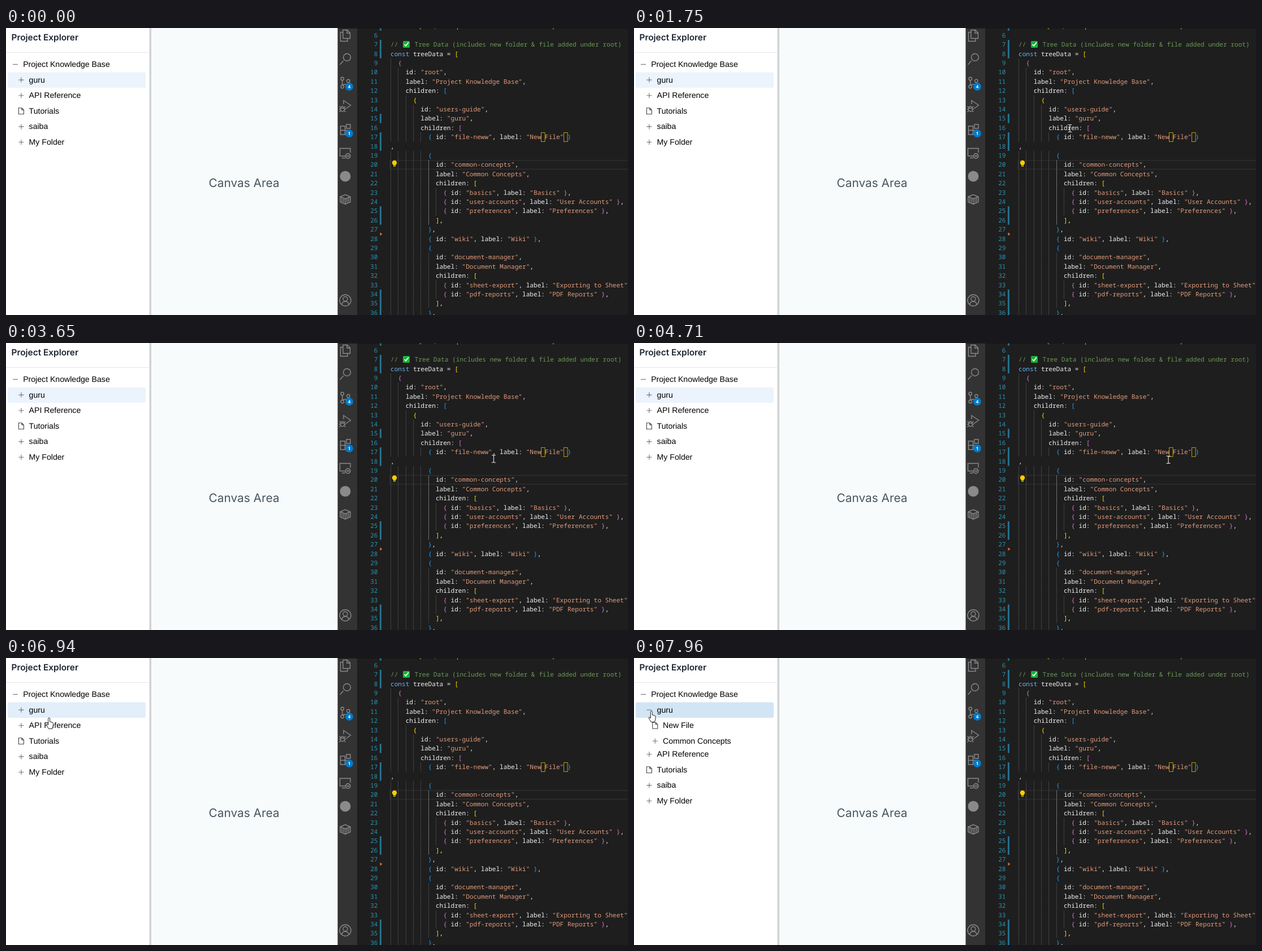
Recreate the animation shown at these times as an HTML page. Size 1100 by 509 pixels, loop 8000 ms.

```html
<!DOCTYPE html>
<html lang="en">
<head>
<meta charset="utf-8">
<title>Project Explorer</title>
<style>
  html, body { margin: 0; height: 100%; overflow: hidden; }
  svg { display: block; width: 100vw; height: 100vh; }
  text { white-space: pre; text-rendering: geometricPrecision; }
  .code text { font: 500 11.1px "Noto Sans Mono", "DejaVu Sans Mono", monospace; fill: #f0f0f0; }
  .code .number { fill: #2b91af; text-anchor: end; }
  .tree text { font: 14.1px "Liberation Sans", Arial, sans-serif; fill: #000; }
  .tree path { fill: none; stroke: #75707c; stroke-width: 1.1; }
  .tree .file { stroke: #444; }
  .icons { fill: none; stroke: #8a8a8a; stroke-width: 1.4; }
  .badge circle { fill: #007acc; stroke: none; }
  .badge text { font: bold 8px "Open Sans", sans-serif; fill: #fff; stroke: none; text-anchor: middle; }
  .cursor { stroke-linejoin: round; }
</style>
</head>
<body>
<svg viewBox="0 0 1100 509" preserveAspectRatio="none">
  <defs>
    <pattern id="hatch" width="3" height="3" patternUnits="userSpaceOnUse">
      <rect width="3" height="3" fill="#1e3c48"/>
      <path d="M0 3L3 0" stroke="#2a9ac4" stroke-width="1.4"/>
    </pattern>
    <clipPath id="reveal"><rect id="revealBox" y="106" width="253" height="0"/></clipPath>
  </defs>

  <rect width="1100" height="509" fill="#fff"/>
  <rect x="257" width="330" height="509" fill="#f8fbfb"/>
  <rect x="253.5" width="3.5" height="509" fill="#d0d4d7"/>
  <path d="M0 43.5H253" stroke="#e4e6e9"/>
  <text x="9.5" y="22" font-family="Inter, sans-serif" font-size="15.4" font-weight="600" fill="#1b2430">Project Explorer</text>
  <text x="421" y="282" font-family="Inter, sans-serif" font-size="20.8" fill="#465560" text-anchor="middle">Canvas Area</text>

  <g class="tree">
    <rect id="selected" x="3" y="78.5" width="244" height="27.5" rx="3"/>
    <g id="topRows"></g>
    <g id="childRows" clip-path="url(#reveal)"></g>
    <g id="lowRows"></g>
  </g>

  <rect x="586.5" width="35" height="509" fill="#333"/>
  <g class="icons">
    <path transform="translate(600 13)" d="M-4-9.500H3.500L8.500-4.500V5.500H-4ZM3-9.500V-4H8.500M-4-5.500H-8.500V10.500H4V5.500"/>
    <path transform="translate(600 55)" d="M-3.300 3.300L-9.500 10M9.500-3A6.500 6.500 0 1 1-3.500-3A6.500 6.500 0 1 1 9.500-3Z"/>
    <path transform="translate(600 97)" d="M-2.500-7A2.700 2.700 0 1 1-7.900-7A2.700 2.700 0 1 1-2.500-7ZM-2.500 7A2.700 2.700 0 1 1-7.900 7A2.700 2.700 0 1 1-2.500 7ZM8-3A2.700 2.700 0 1 1 2.600-3A2.700 2.700 0 1 1 8-3ZM-5.200-4.300V4.300M5.300-.3Q5 3-.5 3Q-4 3-5.200 5"/>
    <path transform="translate(600 138)" d="M-3-3V-9.500L9.500-1L1 5M-1.500 5.500A3.500 4.500 0 1 1-8.500 5.500A3.500 4.500 0 1 1-1.500 5.500ZM-8.500 4H-1.500M-10.500 1L-8 3M.5 1L-2 3M-11 6H-8.500M-1.500 6H1M-10.500 11L-8 8.500M.5 11L-2 8.500"/>
    <path transform="translate(600 180)" d="M-8.500-6H-.5V9H-8.500ZM-8.500 1.500H7V9H-.5M7 9V1.500M2-9H9V-2H2Z"/>
    <path transform="translate(600 222)" d="M0 5H-9.500V-8.500H9V-1M-6 8.500H0M9 5A4.300 4.300 0 1 1 .4 5A4.300 4.300 0 1 1 9 5ZM2.500 3.500L4 5L2.500 6.500M7 3.500L5.500 5L7 6.500"/>
    <circle cx="600" cy="263" r="9.500" fill="#8a8a8a" stroke="none"/>
    <path transform="translate(600 304)" d="M-9-4.500L0-8.500L9-4.500V4.500L0 8.500L-9 4.500ZM-9-4.500L0-1L9-4.500M0-1V8.500M-6-2V4.500M-3-1V5.500M3-1V5.500M6-2V4.500"/>
    <path transform="translate(600 483)" d="M10 0A10 10 0 1 1-10 0A10 10 0 1 1 10 0ZM4-2.500A4 4 0 1 1-4-2.500A4 4 0 1 1 4-2.500ZM-6.500 7.500Q-5 2 0 2Q5 2 6.500 7.500"/>
    <g class="badge">
      <circle cx="607" cy="104" r="7"/><text x="607" y="107">4</text>
      <circle cx="607" cy="187" r="7"/><text x="607" y="190">1</text>
    </g>
  </g>

  <rect x="621" width="479" height="509" fill="#1e1e1e"/>
  <g class="code">
    <g id="lines"></g>
    <g id="gutter"></g>
  </g>
  <path d="M587 .5H1100" stroke="#111" stroke-opacity=".7"/>

  <g class="cursor" id="cursor">
    <path data-kind="beam" d="M-3.500-6.500H-1L0-5.500L1-6.500H3.500M0-5.500V5.500M-3.500 6.500H-1L0 5.500L1 6.500H3.500" fill="none" stroke="#e8e8e8" stroke-width="1.100"/>
    <path data-kind="arrow" d="M0 0V13L3 10.200L5.200 15.200L7.400 14.200L5.200 9.400H9.400Z" fill="#fff" stroke="#111" stroke-width=".8"/>
    <path data-kind="hand" d="M-1.700 10V1.500A1.500 1.500 0 0 1 1.300 1.500V7L5.500 8Q7 8.500 7 10.300V14L5.500 19.500H-1L-4.700 13Q-5.300 11-3.500 10.800L-1.700 13Z" fill="#fff" stroke="#222"/>
  </g>
</svg>

<script>
const byId = id => document.getElementById(id);

// Sidebar tree
const ROW = 27.6;
const glyphs = {
  plus: (x, y) => `<path d="M${x - 4.5} ${y}h9M${x} ${y - 4.5}v9"/>`,
  minus: (x, y) => `<path d="M${x - 4.5} ${y}h9"/>`,
  file: (x, y) => `<path class="file" d="M${x - 4.5} ${y - 5.5}h5.500l3.500 3.500v7.500h-9zm5.500 0v3.500h3.500"/>`,
};
function treeRow(row, level, glyph, label, id = "") {
  const x = 16.5 + level * 10.4, y = 64.5 + row * ROW;
  return `<g id="${id}">${glyphs[glyph](x, y)}</g><text x="${x + 13.7}" y="${Math.round(y + 4.5)}">${label}</text>`;
}
byId("topRows").innerHTML = treeRow(0, 0, "minus", "Project Knowledge Base") + treeRow(1, 1, "plus", "guru", "toggle");
byId("childRows").innerHTML = treeRow(2, 2, "file", "New File") + treeRow(3, 2, "plus", "Common Concepts");
byId("lowRows").innerHTML = treeRow(2, 1, "plus", "API Reference") + treeRow(3, 1, "file", "Tutorials")
  + treeRow(4, 1, "plus", "saiba") + treeRow(5, 1, "plus", "My Folder");

// Code editor
const LEFT = 680, CHAR = 6.66, LINE = 16.4, FIRST = 6;
const lineY = n => 12.8 + (n - FIRST) * LINE;
const source = `

const treeData = [
  {
    id: "root",
    label: "Project Knowledge Base",
    children: [
      {
        id: "users-guide",
        label: "guru",
        children: [
          { id: "file-neww", label: "New File" }
,
          {
            id: "common-concepts",
            label: "Common Concepts",
            children: [
              { id: "basics", label: "Basics" },
              { id: "user-accounts", label: "User Accounts" },
              { id: "preferences", label: "Preferences" },
            ],
          },
          { id: "wiki", label: "Wiki" },
          {
            id: "document-manager",
            label: "Document Manager",
            children: [
              { id: "sheet-export", label: "Exporting to Sheet" },
              { id: "pdf-reports", label: "PDF Reports" },
            ],
          },`.split("\n");

const bracketColors = ["#ffd700", "#da70d6", "#179fff"];
let depth = 0;
function highlight(line) {
  return line.replace(/"[^"]*"|const|[{}[\]]/g, token => {
    let color = "#e09a7c";
    if (token === "const") color = "#6cb2ec";
    else if ("{[".includes(token)) color = bracketColors[depth++ % 3];
    else if ("}]".includes(token)) color = bracketColors[--depth % 3];
    return `<tspan fill="${color}">${token}</tspan>`;
  });
}

const changedRanges = [[5, 5], [7, 8], [15, 15], [17, 18], [25, 26], [34, 36]];
let editor = `<rect x="679" y="${lineY(20) - 7.5}" width="430" height="15.5" fill="none" stroke="#303030" stroke-width="1.3"/>`;
for (const [from, to] of changedRanges) {
  editor += `<rect x="661" y="${lineY(from) - 8.2}" width="3" height="${(to - from + 1) * LINE}" fill="url(#hatch)"/>`;
}
source.forEach((line, i) => {
  const n = FIRST + i, y = lineY(n), baseline = Math.round(y) + 4;
  for (let col = 0; col < line.search(/\S|$/); col += 2) {
    const active = col === 10 && n >= 20 && n <= 26;
    editor += `<rect x="${Math.round(LEFT + col * CHAR)}" y="${y - 8.2}" width="1" height="${LINE}" fill="${active ? "#707070" : "#404040"}"/>`;
  }
  editor += `<text class="number" x="657.5" y="${baseline}">${n}</text>
    <text xml:space="preserve" x="${LEFT}" y="${baseline}">${highlight(line)}</text>`;
});
for (const col of [40, 46]) {
  editor += `<rect x="${Math.round(LEFT + col * CHAR) + .5}" y="185.500" width="6.600" height="16" fill="none" stroke="#bd9b03"/>`;
}
editor += `
  <text x="${LEFT}" y="33" style="fill:#6a9955">//</text>
  <text x="722.500" y="33" style="fill:#6a9955">Tree Data (includes new folder &amp; file added under root)</text>
  <rect x="702" y="23" width="12" height="12" rx="1.500" fill="#16b337"/>
  <path d="M704.500 29L707 31.700L711.800 25.500" fill="none" stroke="#fff" stroke-width="1.800"/>
  <text x="729" y=".3" style="fill:#ffd700">[</text><text x="756" y=".3">,</text>
  <text x="797" y=".3">p</text><text x="965" y=".3" style="fill:#ffd700">]</text>
  <path d="M661.500 362.500L665.500 365.500L661.500 368.500Z" fill="#d8703a"/>
  <path d="M685 243Q682.500 241 682.800 239A4.200 4.200 0 0 1 691.200 239Q691.500 241 689 243V246H685Z" fill="#fc0"/>
  <path d="M685.500 244.500H688.500" stroke="#1e1e1e"/>`;
byId("lines").innerHTML = editor;

const foldable = [8, 9, 12, 13, 16, 19, 22, 29, 32];
byId("gutter").innerHTML = `<circle id="breakpoint" cx="629" r="4" fill="#5c1414"/>`
  + foldable.map(n => `<path d="M666.500 ${lineY(n) - 2}l3.500 3.500l3.500-3.500" fill="none" stroke="#4c4c4c"/>`).join("");

// Pointer: bursts of movement [start, end, steps] along a path of [time, x, y]
const LOOP = 8000;
const bursts = [[380, 590, 4], [790, 1540, 12], [1610, 2360, 11], [2420, 2970, 9], [3370, 4150, 12],
  [4220, 5000, 12], [5060, 5820, 12], [5890, 6450, 9], [6650, 7400, 12], [7470, 7470, 1]];
const route = [[380, 957, 315], [450, 890, 390], [520, 800, 476], [590, 759, 434],
  [790, 750, 400], [930, 700, 160], [1063, 678, 56], [1270, 690, 75], [1540, 758, 168],
  [2360, 806, 205], [2489, 813, 205], [2970, 844, 200], [3370, 845, 200], [4150, 893, 215],
  [4716, 945, 207], [5000, 979, 201], [5350, 1002, 192], [5682, 869, 181], [5820, 845, 176],
  [6450, 494, 146], [6650, 460, 146], [6923, 76, 106], [7130, 40, 90], [7400, 28, 90], [7470, 31, 94]];

function stepTime(t) {
  const [start, end, steps] = bursts.findLast(b => b[0] <= t);
  if (t >= end) return end;
  const dt = (end - start) / (steps - 1);
  return start + dt * Math.floor((t - start) / dt + .15);
}
function pointerAt(t) {
  const time = stepTime(t);
  const i = Math.max(1, route.findIndex(p => p[0] >= time));
  const [t0, x0, y0] = route[i - 1], [t1, x1, y1] = route[i];
  const k = (time - t0) / (t1 - t0);
  return [x0 + (x1 - x0) * k, y0 + (y1 - y0) * k];
}

const cursor = byId("cursor"), gutter = byId("gutter");
function drawPointer(t) {
  const visible = t >= 380;
  cursor.style.display = visible ? "" : "none";
  gutter.style.display = "none";
  if (!visible) return;
  const [x, y] = pointerAt(t);
  const kind = x < 247 ? "hand" : x < LEFT ? "arrow" : "beam";
  cursor.setAttribute("transform", `translate(${x} ${y})`);
  for (const shape of cursor.children) shape.style.display = shape.dataset.kind === kind ? "" : "none";
  if (t < 2000 && x < LEFT) {
    gutter.style.display = "";
    byId("breakpoint").setAttribute("cy", lineY(Math.round(FIRST + (y - 12.8) / LINE)));
  }
}

let wasOpen = null;
function drawTree(t) {
  const shift = t >= 7960 ? 51 : t >= 7890 ? 28 : 0;
  const open = shift > 0;
  byId("selected").setAttribute("fill", t >= 7740 ? "#d1e5f5" : t >= 6850 ? "#e3eefb" : "#ebf3fc");
  byId("revealBox").setAttribute("height", shift);
  byId("lowRows").setAttribute("transform", `translate(0 ${shift})`);
  if (open !== wasOpen) byId("toggle").innerHTML = glyphs[open ? "minus" : "plus"](26.9, 92.1);
  wasOpen = open;
}

const began = performance.now();
function frame() {
  const t = (performance.now() - began) % LOOP;
  drawTree(t);
  drawPointer(t);
  requestAnimationFrame(frame);
}
frame();
</script>
</body>
</html>
```
